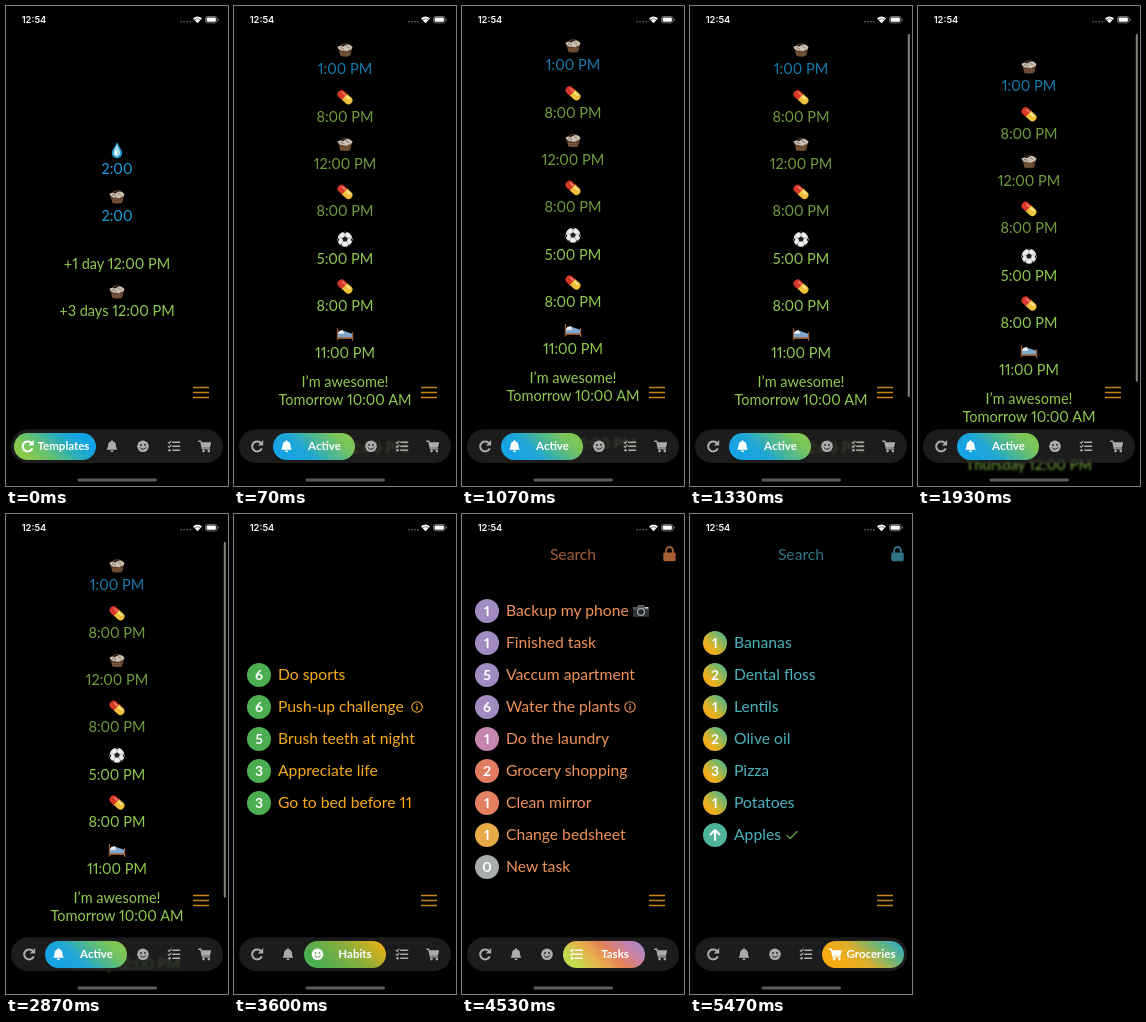
Animation, 222 px wide and 480 px high, one loop 5670 ms. Source, as an HTML page:

```html
<!DOCTYPE html>
<html lang="en">
<head>
<meta charset="utf-8">
<title>Reminders</title>
<style>
  html, body { margin: 0; width: 100%; height: 100%; overflow: hidden; background: #000; }
  svg { display: block; width: 100vw; height: 100vh; }
  text { font-family: Lato, "Open Sans", sans-serif; font-variant-numeric: proportional-nums; }
  .time { font-size: 14.5px; text-anchor: middle; }
  .row { font-size: 15.7px; }
  .mid { text-anchor: middle; }
  .badge { font-size: 14px; font-weight: 700; fill: #fff; text-anchor: middle; }
  .label { font-size: 11.5px; font-weight: 700; fill: #fff; text-anchor: middle; }
  .clock { font: 600 9.3px Inter, sans-serif; fill: #fff; }
  .line { fill: none; stroke-linecap: round; stroke-linejoin: round; }
</style>
</head>
<body>
<svg id="stage" viewBox="0 0 222 480" preserveAspectRatio="none">
  <defs>
    <filter id="soft" x="-10%" y="-60%" width="120%" height="220%"><feGaussianBlur stdDeviation="1.1"/></filter>
    <g id="drop">
      <path d="M0-8C2-3 5.2 0 5.2 3.2A5.2 5 0 0 1-5.2 3.2C-5.2 0-2-3 0-8Z" fill="#2b98d4"/>
      <path d="M0-6C1.5-2 3 0 3 3A3 3.2 0 0 1-2 5.5C-4-1-1-2 0-6Z" fill="#a9e2f8"/>
      <ellipse cx="-1.4" cy="3" rx="1.4" ry="2.4" fill="#f2fcff"/>
    </g>
    <g id="basket">
      <path d="M-5-2C-4-7.5 5-7.5 6-2" class="line" stroke="#59402c" stroke-width="1.2"/>
      <path d="M-7-2L7-1L5 6Q0 7.5-4.5 6Z" fill="#5f432d"/>
      <path d="M-5 3H5.5M-4.5 5H5" stroke="#8d6a4a" stroke-width=".9" stroke-dasharray="2 1"/>
      <path d="M-7.6-3Q-5-5-2-3.6Q2-6.5 5-5L7.5-3Q7 0 4 0Q2 2-1 .6Q-5 1.5-7.6-3Z" fill="#c9beb2"/>
      <path d="M-5-2.5L-1-1M1-4L4-2" stroke="#84746a" stroke-width=".9"/>
    </g>
    <g id="pill" transform="rotate(42)">
      <path d="M0-4H-4.6A4 4 0 0 0-4.6 4H0Z" fill="#d8382a"/>
      <path d="M-.6-4H4.6A4 4 0 0 1 4.6 4H-.6Z" fill="#f0c23c"/>
      <path d="M-5-1.8H-1.6" class="line" stroke="#f2907c" stroke-width="1.3"/>
      <path d="M1-1.8H5" class="line" stroke="#ffeda6" stroke-width="1.5"/>
    </g>
    <g id="ball">
      <circle r="7.5" fill="#ececec"/>
      <path d="M0-3L2.9-.9L1.8 2.4H-1.8L-2.9-.9Z" fill="#222"/>
      <path d="M0-3V-6M2.9-.9L6-2M1.8 2.4L3.5 5M-1.8 2.4L-3.5 5M-2.9-.9L-6-2" stroke="#999" stroke-width=".6"/>
      <path d="M-2.3-7.1H2.3L0-5.6ZM7.3-1.8L6.8 2.6L5.6.4ZM-7.3-1.8L-6.8 2.6L-5.6.4ZM2.5 7L5 5.5L3.4 4.8ZM-2.5 7L-5 5.5L-3.4 4.8Z" fill="#222"/>
    </g>
    <g id="bed">
      <path d="M-7.5-5V6M7.5-1V6.5" class="line" stroke="#9a5a35" stroke-width="1.4"/>
      <path d="M-7 0L-3-3.5L7 0V4H-7Z" fill="#7fa9cc"/>
      <path d="M-7-1Q-6-4-2-3.5L-1 0H-7Z" fill="#eef2f5"/>
      <path d="M-7 3.5H7.5V5H-7Z" fill="#b56c40"/>
    </g>
    <g id="camera">
      <path d="M-8-4H-4L-3-6H3L4-4H8V5.5H-8Z" fill="#55595c"/>
      <path d="M-8-1.5H8V5.5H-8Z" fill="#303335"/>
      <circle cy="1" r="4" fill="#a4a8aa"/><circle cy="1" r="2.8" fill="#1d2930"/>
      <path d="M4-3.2H7" stroke="#e5e5e5" stroke-width="1.3"/>
    </g>
    <g id="refresh">
      <path d="M4.4-2.6A5 5 0 1 0 4.4 2.8" class="line" stroke="currentColor" stroke-width="2"/>
      <path d="M6.2-6.2V-.8H.8Z" fill="currentColor"/>
    </g>
    <g id="bell">
      <path d="M0-6C.8-6 1-5.4 1-4.8C3.4-4.3 4-2.4 4-.5C4 1.8 5.2 2.2 5.2 3.5H-5.2C-5.2 2.2-4 1.8-4-.5C-4-2.4-3.4-4.3-1-4.8C-1-5.4-.8-6 0-6ZM-1.6 4.3H1.6A1.6 1.6 0 0 1-1.6 4.3Z" fill="currentColor"/>
    </g>
    <g id="smile">
      <circle r="5.8" fill="currentColor"/>
      <g fill="var(--hole)"><circle cx="-2" cy="-1.3" r=".9"/><circle cx="2" cy="-1.3" r=".9"/></g>
      <path d="M-2.9 1.5Q0 4.6 2.9 1.5" class="line" stroke="var(--hole)" stroke-width="1"/>
    </g>
    <g id="checks">
      <path d="M-1.2-4H5.6M-1.2 0H5.6M-1.2 4H5.6" class="line" stroke="currentColor" stroke-width="1.6"/>
      <path d="M-5.8-4L-4.8-3L-3-5.2M-5.8 0L-4.8 1L-3-1.2" class="line" stroke="currentColor" stroke-width="1.2"/>
      <circle cx="-4.5" cy="4" r="1.2" fill="currentColor"/>
    </g>
    <g id="cart">
      <path d="M-6.2-5H-4.2L-2.4 2.6H4.6" class="line" stroke="currentColor" stroke-width="1.4"/>
      <path d="M-4-4H6.2L4.9 1.4H-2.8Z" fill="currentColor"/>
      <circle cx="-1.5" cy="4.8" r="1.3" fill="currentColor"/><circle cx="3.8" cy="4.8" r="1.3" fill="currentColor"/>
    </g>
    <g id="lock">
      <path d="M-3.4-1V-3.6A3.4 3.4 0 0 1 3.4-3.6V-1" fill="none" stroke="currentColor" stroke-width="1.8"/>
      <rect x="-6.2" y="-1.4" width="12.4" height="8.6" rx="1.4" fill="currentColor"/>
    </g>
    <g id="info">
      <circle r="5.2" fill="none" stroke="currentColor" stroke-width="1.1"/>
      <path d="M0-.6V2.6M0-2.6V-2.5" class="line" stroke="currentColor" stroke-width="1.3"/>
    </g>
  </defs>
  <rect width="222" height="480"/>
  <g id="pages"></g>
  <rect id="thumb" x="217.8" y="28" width="2" rx="1" fill="#85857c"/>
  <path d="M187 381.5H203M187 386.5H203M187 391.5H203" stroke="#cb850f" stroke-width="1.6"/>
  <rect x="5" y="423.5" width="212" height="33.5" rx="16.75" fill="#262626" fill-opacity=".76"/>
  <g id="tabs"></g>
  <text class="clock" x="15.7" y="17.2">12:54</text>
  <g fill="#777"><circle cx="175" cy="15.7" r=".8"/><circle cx="178" cy="15.7" r=".8"/><circle cx="181" cy="15.7" r=".8"/><circle cx="184" cy="15.7" r=".8"/></g>
  <path d="M187 12.4Q191.5 8.4 196 12.4L191.5 17.2Z" fill="#fff"/>
  <path d="M188.4 13.9Q191.5 11.3 194.6 13.9" fill="none" stroke="#000" stroke-width=".5"/>
  <rect x="199.5" y="10.5" width="11.5" height="6.4" rx="1.8" fill="none" stroke="#888" stroke-width=".8"/>
  <rect x="200.6" y="11.6" width="9.3" height="4.2" rx="1" fill="#fff"/>
  <path d="M212.2 12.8V14.6" stroke="#888"/>
  <rect x="71.5" y="472.6" width="79.5" height="2.8" rx="1.4" fill="#5c5c5c"/>
</svg>
<script>
const $ = id => document.getElementById(id);
const BLUE = '#1ba0e0', GREEN = '#8fca50';

const use = (id, x, y, color = '#fff', hole = '#202020') =>
  `<use href="#${id}" x="${x}" y="${y}" style="color:${color};--hole:${hole}"/>`;
const place = (id, x, y) => `<g transform="translate(${x} ${y})"><use href="#${id}"/></g>`;
const text = (cls, x, y, color, s, alpha = 1) =>
  `<text class="${cls}" x="${x}" y="${y}" fill="${color}" opacity="${alpha}">${s}</text>`;
const gradient = (id, colors, y2 = 0) =>
  `<linearGradient id="${id}" x1="0" y1="${y2}" x2="1" y2="0">` +
  colors.map((c, i) => `<stop offset="${i / (colors.length - 1)}" stop-color="${c}"/>`).join('') + '</linearGradient>';

// One reminder: a picture with its time below.
const reminder = (pic, y, color, s, alpha) =>
  (pic ? place(pic, 111, y - 19) : '') + text('time', 111, y + 5.3, color, s, alpha);

const list = (top, color, items) => items.map(([mark, fill, s], i) => {
  const y = top + 32 * i;
  const sign = mark === 'up'
    ? `<path class="line" d="M25 ${y + 5}V${y - 5}M20.5 ${y - .5}L25 ${y - 5}L29.5 ${y - .5}" stroke="#fff" stroke-width="2"/>`
    : text('badge', 25, y + 5, '#fff', mark);
  return `<circle cx="25" cy="${y}" r="12" fill="${fill}"/>${sign}${text('row', 44, y + 5.3, color, s)}`;
}).join('');

const search = color => text('row mid', 111, 45.5, color, 'Search') + use('lock', 207.5, 40, color);

function templatesPage() {
  return reminder('drop', 163, BLUE, '2:00') + reminder('basket', 210, BLUE, '2:00') +
    reminder('', 258, GREEN, '+1 day 12:00 PM') + reminder('basket', 305, GREEN, '+3 days 12:00 PM');
}

function activePage() {
  const rows = [
    ['basket', '1:00 PM'], ['pill', '8:00 PM'], ['basket', '12:00 PM'], ['pill', '8:00 PM'],
    ['ball', '5:00 PM'], ['pill', '8:00 PM'], ['bed', '11:00 PM'], ['', 'Tomorrow 10:00 AM']
  ];
  return rows.map(([pic, s], i) =>
    reminder(pic, 63 + 47.3 * i, i ? GREEN : BLUE, s, i < 4 ? .78 : 1)).join('') +
    text('time', 111, 380.5, GREEN, 'I’m awesome!') +
    `<g filter="url(#soft)" opacity=".66" font-weight="700">${text('time', 111, 447, GREEN, 'Thursday 12:00 PM')}</g>`;
}

function habitsPage() {
  const color = '#f6a91b', names = ['Do sports', 'Push-up challenge', 'Brush teeth at night', 'Appreciate life', 'Go to bed before 11'];
  return list(161, color, names.map((s, i) => ['66533'[i], '#4bae50', s])) + use('info', 183, 193, color);
}

function tasksPage() {
  const color = '#ee9258', purple = '#a28bc0';
  return search('#a65e34') + list(97, color, [
    [1, purple, 'Backup my phone'], [1, purple, 'Finished task'], [5, purple, 'Vaccum apartment'],
    [6, purple, 'Water the plants'], [1, '#c585ae', 'Do the laundry'], [2, '#e07c60', 'Grocery shopping'],
    [1, '#e38060', 'Clean mirror'], [1, '#e6ab48', 'Change bedsheet'], [0, '#a9adab', 'New task']
  ]) + place('camera', 179, 97) + use('info', 168, 193, color);
}

function groceriesPage() {
  const names = ['Bananas', 'Dental floss', 'Lentils', 'Olive oil', 'Pizza', 'Potatoes'];
  const items = names.map((s, i) => ['121231'[i], 'url(#fruit)', s]);
  return search('#2e7385') + list(129, '#4ab2bc', [...items, ['up', '#4db39a', 'Apples']]) +
    '<path class="line" d="M97 321.5L100.2 324.5L107 317.5" stroke="#5d9c3c" stroke-width="1.4"/>';
}

const pages = [templatesPage, activePage, habitsPage, tasksPage, groceriesPage];
const tabs = [
  ['refresh', 'Templates', 49.5, ['#86c94c', '#62c074', '#2fafb4', '#14a3e2', '#14a3e2']],
  ['bell', 'Active', 51.5, ['#16a3e4', '#1fa6d6', '#4cb792', '#78c45c', '#86c94c']],
  ['smile', 'Habits', 51, ['#4bae50', '#8aae3c', '#f8b010']],
  ['checks', 'Tasks', 52, ['#c3d84c', '#e8b04a', '#e2805c', '#c583ae', '#9a88c2']],
  ['cart', 'Groceries', 49, ['#f8ab10', '#e0ad28', '#6fb577', '#27a5cf']]
];

function tabBar(active) {
  const [icon, label, dx] = tabs[active], left = 8 + 31 * active;
  const others = tabs.map(([id], i) =>
    i === active ? '' : use(id, 23 + 31 * i + (i > active ? 52 : 0), 440.3, '#acacac')).join('');
  return `${others}<rect x="${left}" y="427" width="82" height="27" rx="13.5" fill="url(#tab${active})"/>` +
    use(icon, left + 13.5, 440.3, '#fff', '#5aa84a') + text('label', left + dx, 444.3, '#fff', label);
}

document.querySelector('defs').insertAdjacentHTML('beforeend',
  tabs.map((t, i) => gradient('tab' + i, t[3], .35)).join('') +
  gradient('fruit', ['#f5a912', '#e9b022', '#86b75c', '#3fb2a8'], 1));
$('pages').innerHTML = pages.map(p => `<g>${p()}</g>`).join('');
$('tabs').innerHTML = pages.map((_, i) => `<g>${tabBar(i)}</g>`).join('');

// start ms, page, scroll offset, scroll bar opacity
const steps = [
  [0, 0, 0, 0], [70, 1, 0, 0],
  [1070, 1, -4, 0], [1130, 1, -3, .35], [1200, 1, -2, .65], [1260, 1, -1, .9], [1330, 1, 0, 1],
  [1930, 1, 17, 1], [2670, 1, 23, 1], [2730, 1, 18, 1], [2800, 1, 12, 1], [2870, 1, 8, 1],
  [3600, 2, 0, 0], [4530, 3, 0, 0], [5470, 4, 0, 0]
];
const LOOP = 5670;
const pageNodes = [...$('pages').children], tabNodes = [...$('tabs').children];

function draw(now) {
  const t = now % LOOP;
  const [, page, offset, bar] = steps.findLast(s => s[0] <= t);
  [pageNodes, tabNodes].forEach(nodes =>
    nodes.forEach((n, i) => n.setAttribute('display', i === page ? 'inline' : 'none')));
  pageNodes[1].setAttribute('transform', `translate(0 ${offset})`);
  $('thumb').setAttribute('height', 363 - .9 * Math.max(offset, 0));
  $('thumb').setAttribute('opacity', bar);
}

const start = performance.now();
function tick() {
  draw(performance.now() - start);
  requestAnimationFrame(tick);
}
tick();
</script>
</body>
</html>
```
